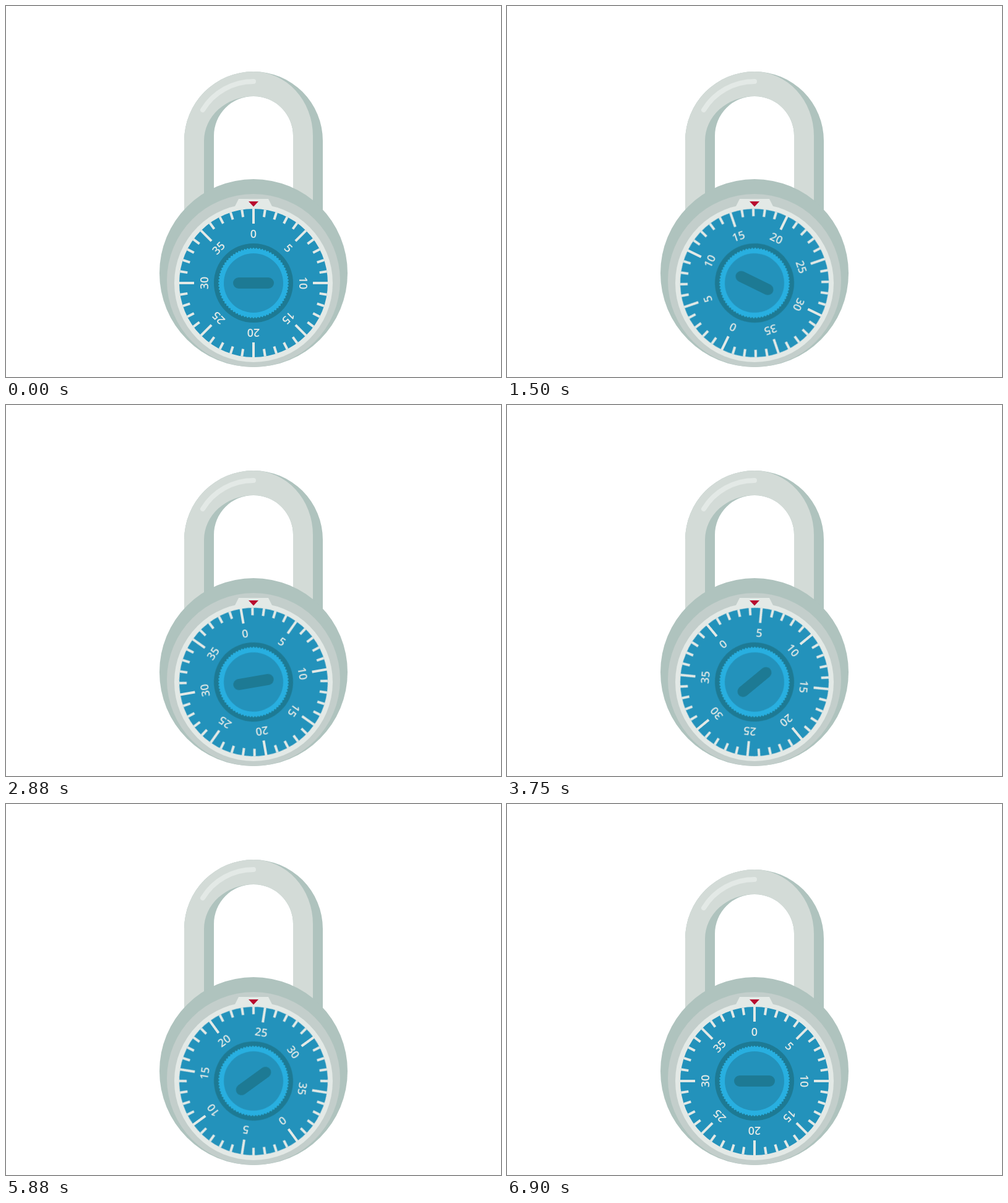
Write an HTML page that moves like this. It is 800x600 px and loops after 7.2 s.

```html
<!DOCTYPE html>
<html lang="en">
<head>
<meta charset="utf-8">
<title>Combination lock</title>
<style>
  html, body { margin: 0; width: 100%; height: 100%; overflow: hidden; background: #fff; }
  svg { display: block; width: 800px; height: 600px; }

  .shade { fill: #afc3be; }
  .steel { fill: #d3dbd7; }
  .rim { fill: #c3cecb; }
  .pale { fill: #e3e9e6; }
  .blue { fill: #2392bb; }
  .deep { fill: #1d7a94; }
  .bright { fill: #28afe0; }
  .teeth { fill: none; stroke: #28afe0; stroke-width: 3; stroke-linecap: round; stroke-dasharray: .01 .99; }
  .ticks { stroke: #e3e9e6; stroke-width: 4; }
  .digits {
    fill: #e3e9e6;
    font: 600 18px "Open Sans", "Noto Sans", sans-serif;
    font-stretch: 75%;
    text-anchor: middle;
  }

  /* 240 steps of 30 ms; the small delay keeps samples off the step edges */
  .dial, .shackle { animation: 7200ms linear -2ms infinite; }
  .dial { animation-name: turn; }
  .shackle { animation-name: lift; }

  @keyframes turn {
    0% { transform: rotate(0deg); }
    0.83333% { transform: rotate(0deg); animation-timing-function: steps(58); }
    25%, 26.66667% { transform: rotate(684deg); animation-timing-function: steps(44); }
    45%, 46.66667% { transform: rotate(225deg); animation-timing-function: steps(38); }
    62.5%, 83.33333% { transform: rotate(504deg); animation-timing-function: steps(30); }
    95.83333%, 100% { transform: rotate(0deg); }
  }
  @keyframes lift {
    0%, 62.5% { transform: translateY(0); animation-timing-function: steps(21); }
    71.25%, 75% { transform: translateY(-80px); animation-timing-function: steps(20); }
    83.33333%, 100% { transform: translateY(0); }
  }
</style>
</head>
<body>
<svg viewBox="0 0 800 600">
  <g class="shackle">
    <path class="shade" d="M288 440V218A112 112 0 0 1 512 218V440H464V210A64 64 0 0 0 336 210V440Z"/>
    <path class="steel" d="M288 440V218A112 112 0 0 1 400 106A96 104 0 0 1 496 210V440H464V210A64 64 0 0 0 400 146A80 72 0 0 0 320 218V440Z"/>
    <path d="M318 168A96 96 0 0 1 400 122" fill="none" stroke="#e3e9e6" stroke-width="8" stroke-linecap="round"/>
  </g>

  <circle class="shade" cx="400" cy="432" r="152"/>
  <circle class="rim" cx="400" cy="444" r="140"/>
  <circle class="pale" cx="400" cy="448" r="128"/>
  <path class="pale" d="M376 312H424L430 324V332H370V324Z"/>
  <path d="M392 316H408L400 324.5Z" fill="#b80c2f"/>

  <g transform="translate(400 448)">
    <g class="dial">
      <circle class="blue" r="120"/>
      <g class="ticks" id="ticks"></g>
      <g class="digits" id="digits"></g>
      <circle class="deep" r="64"/>
      <circle class="bright" r="55.5"/>
      <circle class="teeth" r="55.5" pathLength="72"/>
      <circle class="blue" r="48"/>
      <rect class="deep" x="-33" y="-9" width="66" height="18" rx="9"/>
    </g>
  </g>
</svg>
<script>
  const add = (parent, tag, attrs) => {
    const el = document.createElementNS("http://www.w3.org/2000/svg", tag);
    for (const key in attrs) el.setAttribute(key, attrs[key]);
    return document.getElementById(parent).appendChild(el);
  };

  for (let n = 0; n < 40; n++) {
    const major = n % 5 === 0;
    const transform = `rotate(${n * 9})`;
    add("ticks", "line", { y1: -120, y2: major ? -96 : -108, transform });
    if (major) add("digits", "text", { y: -73.5, transform }).textContent = n;
  }
</script>
</body>
</html>
```
